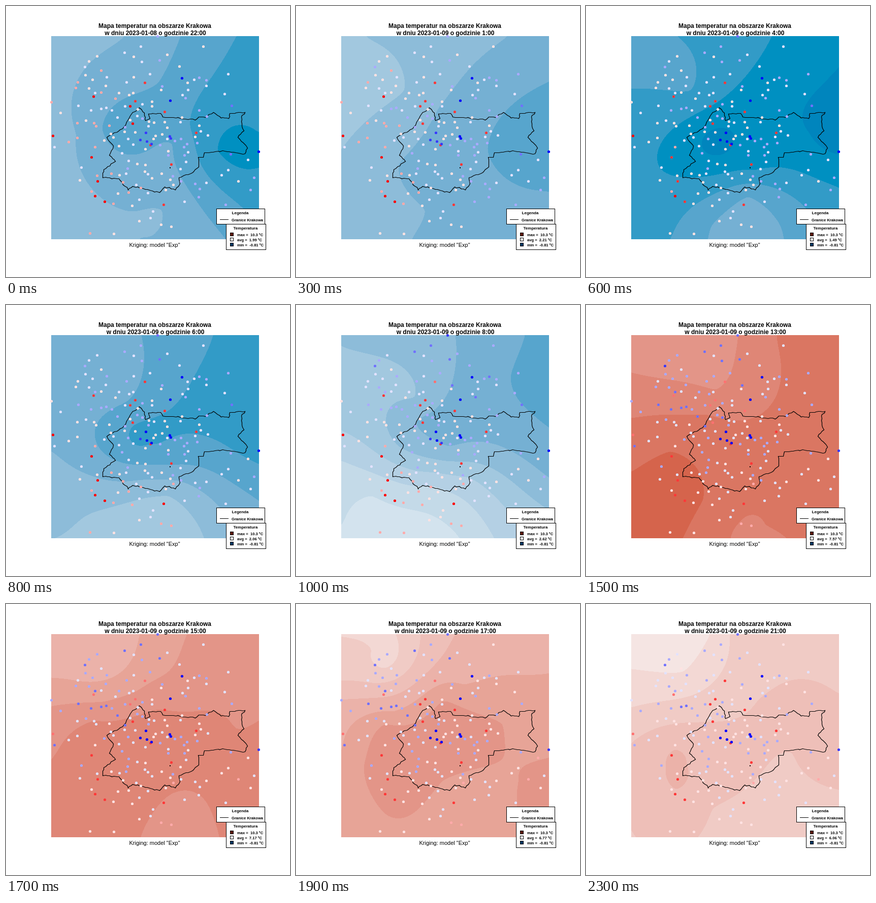
An HTML page with a canvas that plays this animation: 559 by 531 pixels, repeating every 2.4 s.

```html
<!DOCTYPE html>
<html lang="pl">
<head>
<meta charset="utf-8">
<style>
html, body { margin: 0; width: 100%; height: 100%; overflow: hidden; background: #fff; }
canvas { display: block; }
</style>
</head>
<body>
<canvas id="stage" width="559" height="531"></canvas>
<script>
const ctx = document.getElementById('stage').getContext('2d');
const LEFT = 89, TOP = 59, W = 409, H = 398, CELL = 4, COLS = 104, ROWS = 101;

const bands = ('#0085bd #0090c1 #329bc7 #57a5cd #75b0d3 #8dbcd9 #a2c8df #b4d0e4 #c4dae8 #d3e3ee #e2ebf1 ' +
  '#f1f1f1 #f5e5e3 #f3d8d4 #f0cbc5 #eebfb8 #ebb2a9 #e7a497 #e39588 #df8676 #da7662 #d5644c').split(' ');
const dotColors = '#0000ff #3838ff #7171ff #aaaaff #e2e2ff #ffe2e2 #ffaaaa #ff7171 #ff3838 #ff0000'.split(' ');

const pairs = a => a.flatMap((x, i) => i % 2 ? [] : [[x, a[i + 1]]]);
const mix = (a, b, t) => a + (b - a) * t;
const clamp = (v, low, high) => Math.min(high, Math.max(low, v));
const kernel = (x, y) => ((x * x + y * y) / 1e4) ** 0.75;

let seed = 7;
const random = () => (seed = seed * 16807 % 2147483647) / 2147483647;
const spread = size => (random() - 0.5) * size;

// Solves the augmented matrix m by elimination with pivoting.
function solve(m) {
  const n = m.length;
  for (let c = 0; c < n; c++) {
    let p = c;
    for (let r = c; r < n; r++) if (Math.abs(m[r][c]) > Math.abs(m[p][c])) p = r;
    [m[c], m[p]] = [m[p], m[c]];
    for (let r = 0; r < n; r++) {
      if (r === c) continue;
      const f = m[r][c] / m[c][c];
      for (let k = c; k <= n; k++) m[r][k] -= f * m[c][k];
    }
  }
  return m.map((row, i) => row[n] / row[i]);
}

// Kriging: a smooth field through a few isoline points, sampled on a coarse grid.
function makeGrid(lines) {
  const pts = Object.entries(lines).flatMap(([v, a]) => pairs(a).map(p => [...p, +v]));
  const matrix = pts.map(([x, y, v]) => [...pts.map(p => kernel(x - p[0], y - p[1])), 1, v]);
  matrix.push([...pts.map(() => 1), 0, 0]);
  const weights = solve(matrix), base = weights.pop();
  const levels = Object.keys(lines).map(Number);
  const low = Math.ceil(Math.min(...levels)) - 0.95, high = Math.floor(Math.max(...levels)) + 0.95;
  return Float32Array.from({ length: COLS * ROWS }, (_, i) => {
    const x = LEFT + i % COLS * CELL, y = TOP + Math.floor(i / COLS) * CELL;
    const v = pts.reduce((sum, p, k) => sum + weights[k] * kernel(x - p[0], y - p[1]), base);
    return clamp(v, low, high);
  });
}

// A known hour: its mean, the tilt of station colors (middle, eastward, southward) and isolines by level.
const known = [];
function addHour(step, mean, tilt, lines) {
  known.push({ step, mean, tilt, grid: makeGrid(lines) });
}

addHour(0, 1.99, [4.3, -1.1, 0.2], {
  1.4: [492, 282],
  2: [498, 247, 417, 283, 498, 316],
  3: [453, 59, 362, 235, 498, 432],
  3.5: [245, 247],
  4: [343, 59, 299, 150, 326, 270, 432, 457, 189, 240, 258, 290],
  5: [232, 59, 137, 250, 306, 400, 262, 457],
  5.5: [95, 64]
});
addHour(3, 2.21, [4.1, -1, 0.1], {
  3.4: [485, 255],
  4: [498, 147, 377, 282, 498, 364],
  5: [415, 59, 280, 200, 202, 310, 253, 400, 228, 457],
  6: [138, 59, 212, 165, 89, 280],
  6.5: [95, 110]
});
addHour(6, 1.49, [4, -0.6, 0.3], {
  0.6: [258, 268, 485, 256],
  1: [227, 270, 290, 265, 440, 250],
  1.4: [440, 110],
  2: [365, 59, 255, 190, 148, 320, 330, 321, 498, 356],
  3: [180, 59, 205, 165, 89, 162, 165, 457, 300, 350, 465, 457],
  4: [247, 430, 318, 374, 382, 430]
});
addHour(10, 2.62, [4, -0.6, 1.4], {
  4: [450, 59, 422, 140, 498, 240],
  5: [313, 59, 238, 225, 300, 276, 498, 338],
  6: [89, 80, 232, 180, 200, 275, 498, 402],
  7: [89, 245, 240, 325, 340, 338, 460, 457],
  8: [89, 305, 270, 355, 390, 457],
  9: [89, 430, 148, 374, 322, 457]
});
addHour(15, 7.57, [3.7, 0.4, 1], {
  18.4: [150, 80],
  19: [299, 59, 255, 165, 89, 132],
  19.6: [326, 440],
  20: [375, 59, 375, 175, 240, 215, 89, 221, 302, 425, 353, 430],
  20.5: [450, 300, 300, 330],
  21: [89, 326, 165, 287, 230, 380, 190, 457],
  21.5: [110, 420]
});
addHour(19, 6.77, [3.9, 0.7, 0.7], {
  13.5: [174, 98],
  14: [148, 90, 201, 95, 174, 125],
  15: [245, 59, 180, 152, 89, 150],
  16: [313, 59, 230, 158, 89, 187],
  17: [498, 135, 330, 157, 190, 210, 89, 285],
  17.5: [455, 240, 350, 400, 105, 390],
  18: [133, 320, 175, 235, 290, 190, 405, 235, 290, 345, 180, 414, 437, 350],
  18.4: [320, 250, 180, 340, 490, 360]
});
addHour(23, 6.06, [4, 0.5, 0.5], {
  12.5: [110, 80],
  13: [243, 59, 190, 132, 89, 127],
  14: [283, 59, 235, 165, 89, 202],
  15: [498, 175, 340, 186, 170, 235, 89, 272, 498, 364, 405, 292, 250, 400, 89, 443],
  15.4: [460, 260, 120, 360],
  16: [175, 285, 198, 315, 177, 362, 157, 320],
  16.3: [177, 320]
});

const stations = [];
const addStation = (x, y, bias) => stations.push({ x, y, bias });

// Stations spread around the town, then the outer ones, then the clearly warm and cold ones.
const mild = [298, 59, 388, 79, 265, 79, 233, 91, 179, 98, 163, 108, 267, 109, 317, 95, 341, 118, 437, 133, 156, 135,
  170, 144, 141, 149, 380, 140, 394, 145, 358, 164, 430, 172, 444, 195, 89, 188, 107, 209, 140, 229, 123, 266,
  95, 276, 145, 341, 211, 387, 165, 445, 212, 446, 262, 421, 305, 428, 325, 432, 284, 415, 289, 402, 248, 391,
  351, 383, 379, 374, 432, 389, 481, 360, 488, 336, 457, 343, 424, 331, 437, 321, 476, 301, 442, 290, 372, 348];
const warm = [172, 177, 180, 343, 194, 383, 325, 310, 312, 207, 310, 389, 244, 196, 254, 186, 284, 272, 168, 296,
  249, 230, 175, 372, 273, 150, 92, 254, 374, 248];
const cold = [322, 255, 324, 259, 275, 248, 264, 262, 277, 265, 286, 270, 323, 185, 346, 141, 497, 285];
pairs(warm).forEach(p => addStation(...p, 4));
pairs(cold).forEach(p => addStation(...p, -3.6));
pairs(mild).forEach(p => addStation(...p, spread(2.4)));
while (stations.length < 180) {
  const x = Math.round(275 + spread(180) + spread(130)), y = Math.round(240 + spread(170) + spread(130));
  if (stations.every(s => Math.hypot(s.x - x, s.y - y) > 7)) addStation(x, y, spread(2.6));
}

const border = [262, 199, 272, 209, 274, 224, 283, 220, 280, 211, 304, 210, 308, 217, 334, 219, 372, 223, 379, 217,
  392, 218, 408, 208, 423, 219, 438, 220, 440, 210, 470, 208, 463, 217, 464, 230, 468, 244, 456, 257, 475, 278,
  470, 289, 430, 284, 390, 287, 388, 296, 378, 296, 379, 315, 363, 328, 340, 336, 342, 348, 333, 360, 312, 354,
  302, 365, 249, 353, 240, 360, 222, 338, 190, 336, 192, 320, 215, 304, 203, 292, 211, 274, 198, 257, 229, 240,
  246, 212];
const outline = new Path2D();
pairs(border).forEach(([x, y], i, all) => {
  const [nx, ny] = all[(i + 1) % all.length];
  const parts = Math.ceil(Math.hypot(nx - x, ny - y) / 5);
  for (let k = 0; k < parts; k++) {
    const rough = k ? 2.4 : 0;
    outline.lineTo(Math.round(mix(x, nx, k / parts) + spread(rough)) + 0.5,
      Math.round(mix(y, ny, k / parts) + spread(rough)) + 0.5);
  }
});
outline.closePath();

const image = ctx.createImageData(W, H);
const pixels = new Uint32Array(image.data.buffer);
const bandPixels = bands.map(c => parseInt('ff' + c.slice(5) + c.slice(3, 5) + c.slice(1, 3), 16));

function drawField(a, b, t) {
  const grid = a.map((v, i) => mix(v, b[i], t));
  for (let y = 0, p = 0; y < H; y++) {
    const row = Math.floor(y / CELL) * COLS, fy = y % CELL / CELL;
    for (let x = 0; x < W; x++) {
      const i = row + Math.floor(x / CELL), fx = x % CELL / CELL;
      const v = mix(mix(grid[i], grid[i + 1], fx), mix(grid[i + COLS], grid[i + COLS + 1], fx), fy);
      pixels[p++] = bandPixels[clamp(Math.floor(v), 0, bands.length - 1)];
    }
  }
  ctx.putImageData(image, LEFT, TOP);
}

function drawStations(a, b, t) {
  const [middle, east, south] = a.map((v, i) => mix(v, b[i], t));
  for (const { x, y, bias } of stations) {
    const v = middle + east * (x - 293) / 204 + south * (y - 258) / 199 + bias;
    ctx.fillStyle = dotColors[clamp(Math.round(v), 0, 9)];
    ctx.beginPath();
    ctx.arc(x + 0.5, y + 0.5, 2.6, 0, 7);
    ctx.fill();
  }
}

function text(s, x, y, font, align = 'center') {
  ctx.font = font + ' "Liberation Sans", Arial, sans-serif';
  ctx.textAlign = align;
  ctx.fillStyle = '#000';
  ctx.fillText(s, x, y);
}

function box(x, y, w, h, fill = '#fff') {
  ctx.fillStyle = fill;
  ctx.fillRect(x, y, w, h);
  ctx.strokeRect(x, y, w, h);
}

function drawLegend(mean) {
  box(414.5, 397.5, 95, 30);
  text('Legenda', 461, 408, 'bold 8px');
  ctx.fillRect(421, 418, 17, 1);
  text('Granice Krakowa', 444, 422, 'bold 7.6px', 'left');
  box(433.5, 427.5, 78, 50);
  text('Temperatura', 471.5, 438, 'bold 8px');
  [['#5f1a0c', 'max =  10.3 ºC'], ['#fff', `avg =  ${mean.toFixed(2)} ºC`], ['#003a66', 'min =  -0.81 ºC']]
    .forEach(([color, label], i) => {
      box(441.5, 444.5 + i * 10, 6, 6, color);
      text(label, 455, 451 + i * 10, 'bold 7.6px', 'left');
    });
}

function draw(step) {
  const next = Math.max(1, known.findIndex(h => h.step >= step));
  const a = known[next - 1], b = known[next];
  const t = (step - a.step) / (b.step - a.step);
  ctx.fillStyle = '#fff';
  ctx.fillRect(0, 0, 559, 531);
  drawField(a.grid, b.grid, t);
  ctx.strokeStyle = '#000';
  ctx.lineWidth = 1.2;
  ctx.stroke(outline);
  ctx.lineWidth = 1;
  ctx.fillStyle = '#000';
  ctx.fillRect(322, 316, 2, 2);
  drawStations(a.tilt, b.tilt, t);
  text('Mapa temperatur na obszarze Krakowa', 293, 43, 'bold 12px');
  text(`w dniu 2023-01-0${step < 2 ? 8 : 9} o godzinie ${(step + 22) % 24}:00`, 294, 57, 'bold 12px');
  text('Kriging: model "Exp"', 292.5, 472, '11px');
  drawLegend(mix(a.mean, b.mean, t));
}

let shown = -1;
const start = performance.now();
function tick() {
  const step = Math.floor((performance.now() - start) % 2400 / 100);
  if (step !== shown) draw(shown = step);
  requestAnimationFrame(tick);
}
tick();
</script>
</body>
</html>
```
